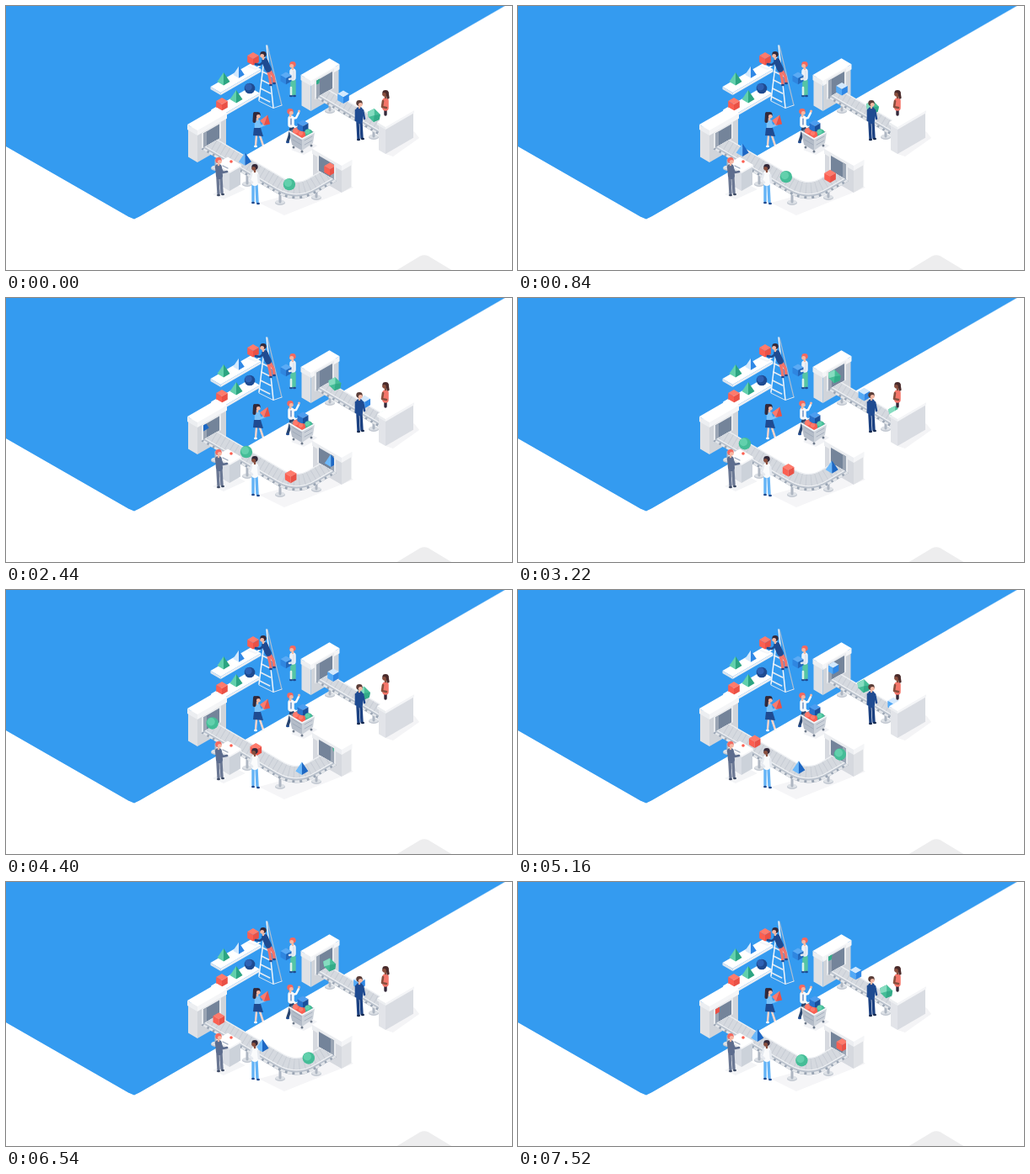
Animation, 600 px wide and 314 px high, one loop 7.54 s. Source, as an HTML page:

```html
<!DOCTYPE html>
<html lang="en">
<head>
<meta charset="utf-8">
<title>Sorting line</title>
<style>
html, body { margin: 0; height: 100%; overflow: hidden; background: #fff; }
svg { display: block; width: 100vw; height: 100vh; }
</style>
</head>
<body>
<svg id="stage" viewBox="0 0 600 314"></svg>
<script>
const LOOP = 7540;
const K = 0.58; // isometric slope
const RED = ['#ff7b6c', '#fb5f51', '#ea5146'];
const BLUE = ['#6cb9fb', '#389af0', '#1d68c4'];
const SKY = ['#d3e9fd', '#52a9f6', '#2f88e6'];
const GREEN = ['#62d0ac', '#45bd97', '#2ca582'];
const NAVY = '#1f4b91', DARK = '#33293a', SKIN = '#f6b9a4', BROWN = '#8a4f3e', GINGER = '#f4695f';
const SLAB = ['#fff', '#eceef1', '#f4f5f7'];

const poly = (points, fill) => `<polygon points="${points}" fill="${fill}"/>`;
const disc = (x, y, rx, fill, ry = rx) => `<ellipse cx="${x}" cy="${y}" rx="${rx}" ry="${ry}" fill="${fill}"/>`;
const line = (d, color, w) =>
  `<path d="${d}" fill="none" stroke="${color}" stroke-width="${w}" stroke-linecap="round" stroke-linejoin="round"/>`;
const at = (x, y, s, scale = 1) => `<g transform="translate(${x} ${y}) scale(${scale})">${s}</g>`;

// Block whose nearest top corner is (x, y): a to the left, b to the right, h down.
function box(x, y, a, b, h, [top, left, right]) {
  const l = [x - a, y - a * K], r = [x + b, y - b * K], back = [x + b - a, y - (a + b) * K];
  const down = ([px, py]) => [px, py + h];
  return poly([l, back, r, [x, y]], top) +
    poly([l, [x, y], [x, y + h], down(l)], left) +
    poly([r, [x, y], [x, y + h], down(r)], right);
}

const cube = (c, r = 6.8) => box(0, 0, r, r, r * 1.12, c);
const pyramid = c => poly('0,-8 -7.5,3 0,7.5', c[0]) + poly('0,-8 0,7.5 7.5,3', c[2]);
const ball = (c, r = 7.2) => disc(0, 0, r, c[1]) + disc(-1.5, -1.7, r * .65, c[0]);
const gem = poly('-7,-4 1,-8 8,-1 7,5 0,8 -6,2', '#45bd97') +
  poly('-7,-4 1,-8 1,0 -6,2', '#86dcc0') + poly('1,0 8,-1 7,5 0,8', '#33ab88');

function machine(x, y, a, b, h, left, right) {
  return box(x, y, a, b, h, ['#fff', left, right]) + box(x, y - 4, a + 1, b + 1, 6, SLAB);
}

// Opening in a face; dir is -1 when its upper edge rises to the right.
function opening(x, y, w, h, dir) {
  const p = (dx, dy) => [x + dx, y + dir * dx * K + dy];
  const quad = (l, r, t, b, c) => poly([p(l, t), p(r, t), p(r, b), p(l, b)], c);
  return quad(-2, w + 2, -2, h + 1, '#e9ebee') + quad(0, w, 0, h, '#74849a') +
    quad(dir < 0 ? 0 : w - 4, dir < 0 ? 4 : w, 0, h, '#9aa5b4');
}

function belt(d, w, clip) {
  const layer = (y, c, width, extra = '') =>
    `<path d="${d}" transform="translate(0 ${y})" fill="none" stroke="${c}" stroke-width="${width}" ${extra}/>`;
  return `<g clip-path="url(#${clip})">` + layer(5, '#9aa5b4', w) + layer(5, '#e3e6ea', w, 'stroke-dasharray="5 2.5"') +
    layer(2, '#b9c1cc', w) + layer(0, '#eef0f3', w) + layer(0, '#d5d9df', w - 2.5) +
    layer(0, '#c8cdd5', w - 2.5, 'stroke-dasharray="1 5"') + '</g>';
}

const foot = (x, y) => disc(x, y + 1, 6, '#c2c8d1', 3) + disc(x, y, 5.5, '#dde1e6', 2.6) +
  line(`M${x} ${y}v-9`, '#aeb6c2', 3);

// Figure placed by its head; face is -1 or 1 in profile and left out from behind.
function figure(x, y, o) {
  const skin = o.skin || SKIN;
  return at(x, y,
    line(o.legs, o.pants, o.legW || 3.4) + (o.shoes || []).map(([sx, sy]) => disc(sx, sy, 2, o.shoe || NAVY, 1.2)).join('') +
    line(o.torso || 'M0 8V16', o.top, o.width || 7.5) + line('M0 2V5', skin, 2.4) +
    disc(0, -.6, 3.7, o.hair, 3.4) + (o.face ? disc(o.face * 1.3, 1.3, 2.4, skin) : '') +
    line(o.arms, o.sleeve || o.top, 2.6));
}

const floor = poly('0,0 591,0 159,250 152,253.5 145,250.5 0,167', '#349bf0') +
  line('M593 -1L157 250.5Q152 253.5 147 250.5L-1 166', '#349bf0', .4) +
  '<path d="M462 315L491 297.5Q496 295 501 297.5L530 315z" fill="#ededee"/>' +
  poly('300,234 330,249 412,216 399,207', '#f5f5f7') +
  poly('245,224 258,230 284,218 270,211', '#f3f4f6') +
  poly('450,176 459,179 490,157 484,149', '#f4f4f6') +
  poly('338,171 353,177 371,167 357,160', '#f1f2f5');

const shelfTones = ['#fff', '#dbe4ee', '#eceff4'];
const shelves = box(254.5, 103, 12, 48, 3, shelfTones) + box(255, 130.5, 12, 46, 3, shelfTones) +
  at(258, 87, pyramid(GREEN)) + at(276, 79, pyramid(SKY), .9) +
  at(256, 117, cube(RED)) + at(273, 108, pyramid(GREEN)) +
  at(289, 98, ball(['#2f62b4', NAVY], 6.3));

const rungs = [78, 88, 98, 108].map(y => `M${304 - (y - 78) * .11} ${y}l12 6`).join('');
const ladder = line('M310 47L327 118', '#a9bdd3', 1.2) + line(rungs, '#e6ecf3', 1.5) +
  line('M307 56L300 112M309 47L317 121', '#f4f7fa', 1.5) + line('M300 113L317 121.500L327 118', '#dfe8f2', 1);

const upperPeople =
  at(293, 63, cube(RED)) + line('M288 72L296 75L301 71', '#f4f6f9', 2) +
  figure(305, 58, { hair: DARK, top: NAVY, pants: '#f47469', torso: 'M2 8L6 17', legs: 'M6 20L8 28L9 35M9 20L12 26L13 33',
    shoes: [[9, 36], [13, 34]], arms: 'M1 8L-4 12L-9 11', face: -1 }) +
  figure(340, 70, { hair: GINGER, top: '#eef2f7', pants: '#55c5a4', torso: 'M0 8V15', legs: 'M-1 19L-1 36M2 19L2 35',
    shoes: [[-2, 37], [2, 37]], arms: 'M1 8L1 14L-4 16', face: -1 }) +
  line('M338 97V105', '#d8f2ea', 2.6) +
  at(332, 86, cube(['#5cabf5', '#2f86e0', '#2368bb'], 6.5)) + line('M341 78L341 86L336 87', '#dfe6ef', 2.4) +
  figure(298, 130, { hair: DARK, top: '#7cc2f8', pants: '#fbd5ca', torso: 'M0 8V14', width: 6.5, face: 1,
    legs: 'M-1 24L-2 36M3 24L7 36', legW: 2.4, shoes: [[-2, 37], [8, 36]], shoe: '#fff', arms: 'M1 8L4 13L9 11' }) +
  line('M295 128L294.500 137', DARK, 4) + poly('294,145 302,145 305,155 293,154', NAVY) +
  at(308, 136, `<g transform="rotate(20)">${pyramid(RED)}</g>`, .85);

const cart = at(0, -1,
  figure(337, 127, { hair: GINGER, top: '#f7f8fa', pants: '#28446f', torso: 'M1 8L1 15', legs: 'M1 19L-1 29L-3 35M3 19L5 30',
    shoes: [[-3, 36]], arms: 'M2 8L7 7L10 1M0 9L2 15L6 18', face: 1 }) +
  disc(347.5, 126, 1.5, SKIN) + line('M338 135v7', '#4a78b8', 1.2) +
  poly('336,150 350,142 365,151 350,160', '#7c899d') +
  at(345, 151, ball(RED, 5)) + at(352, 144, cube(['#4c9df0', '#2872cc', '#1b509b'], 6.5)) +
  at(359, 152, ball(GREEN, 4.5)) + at(351, 154, ball(RED, 4)) +
  poly('336,150 351,159 351,173 339,166', '#b4bcc8') + poly('351,159 366,151 364,164 351,173', '#ccd2da') +
  line('M336 150L351 159L366 151', '#f4f6f8', 1.5) + line('M340 155L350 161M340 160L350 166M354 161L363 156M354 166L363 161', '#97a3b3', .7) +
  disc(341, 169, 1.5, '#6f7b8c') + disc(351, 174, 1.5, '#6f7b8c') + disc(362, 167, 1.5, '#6f7b8c'));

const lowerD = 'M231 156L325 211Q345 222.5 364 210.5L394 193';
const upperD = 'M366 96.5L452 147.5';
const lowerItems = [cube(RED), pyramid(BLUE), ball(GREEN)];
const upperItems = [cube(SKY), gem, cube(SKY), gem];
const movers = (id, items) => `<g id="${id}" clip-path="url(#${id}Clip)">${items.map(s => `<g>${s}</g>`).join('')}</g>`;

const upperLine = machine(361.5, 93, 11, 33, 32, '#dfe1e5', '#d0d4da') + opening(368, 89, 19, 20, -1) +
  foot(384, 124) + foot(436, 155) + belt(upperD, 12, 'upperBelt') + movers('upper', upperItems);

const desk =
  figure(450, 104, { hair: '#4a2b2b', skin: BROWN, top: '#f4766a', pants: DARK, torso: 'M0 9L0 17', legs: 'M0 18V25',
    arms: 'M-3 9L-4 16L1 17', sleeve: BROWN, face: -1 }) +
  line('M452 103L453 109', '#4a2b2b', 3.2) +
  box(450, 145, 8, 33, 31, ['#fff', '#e2e4e9', '#d9dce2']) + box(450, 144, 10, 34, 3, SLAB) +
  figure(419, 116, { hair: '#5a3d38', top: NAVY, pants: '#1b4182', torso: 'M0 8V20', width: 8,
    legs: 'M-2 23L-1 42M2 23L3 41', shoes: [[-1, 43], [4, 42]], shoe: '#15294f', arms: 'M-4 8L-4 20M4 8L6 18', face: 1 });

const lowerLine = machine(227, 152, 11, 34, 34, '#dfe1e5', '#d0d4da') + opening(234, 151.5, 19, 17, -1) +
  machine(398, 194, 34, 11.5, 28, '#d6d9df', '#e0e2e6') + opening(371, 178, 18, 18, 1) +
  [[249, 192], [286, 211], [325, 233], [368, 227]].map(p => foot(...p)).join('') +
  belt(lowerD, 15.5, 'lowerBelt') + movers('lower', [...lowerItems, ...lowerItems]);

const front = box(265, 198, 15, 13, 22, ['#fff', '#d9dde4', '#ccd2da']) + box(265, 197, 16, 14, 2, SLAB) +
  at(267, 185, disc(0, 0, 1.8, RED[1])) + line('M257 190l6 3', '#9ba8bb', 1.3) +
  figure(252, 184, { hair: GINGER, top: '#5d6d8e', pants: '#6b7894', torso: 'M0 8L1 18', width: 8, legs: 'M-1 21L0 39M3 21L4 38',
    shoes: [[0, 41], [5, 40]], shoe: '#3c4964', arms: 'M2 8L5 14L10 13', face: 1 }) +
  figure(295, 192, { hair: DARK, skin: BROWN, top: '#fafbfc', pants: '#63b3f6', torso: 'M0 8V18', width: 8,
    legs: 'M-2 21L-2 40M2 21L3 41', shoes: [[-2, 42], [4, 43]], arms: 'M-4 8L-6 15L-3 18M4 9L5 18', sleeve: '#e6eaf0', face: -1 });

const clip = (id, d) => `<clipPath id="${id}Clip"><path d="${d}z"/></clipPath>`;
document.getElementById('stage').innerHTML =
  clip('upper', 'M368 89L420 58H470V170H360V114L368 109') +
  clip('lower', 'M234 151.500L305 110H371V178L389 188.500V207L400 213V250H225V173L234 168.500') +
  clip('upperBelt', 'M360 113.600L400 90.400H470V170H360').replace('BeltClip', 'Belt') +
  clip('lowerBelt', 'M225 173.700L290 136H340L371 196L400 212.800V250H225').replace('BeltClip', 'Belt') +
  '<path id="track" d="M400 184.500L362 207.500Q345 219 325 207.500L222 144.600" fill="none"/>' +
  floor + shelves + ladder + upperPeople + upperLine + desk + cart + lowerLine + front;

const byId = id => document.getElementById(id);
const track = byId('track');
const lowerNodes = [...byId('lower').children], upperNodes = [...byId('upper').children];
const mod = (v, n) => (v % n + n) % n;
const move = (node, x, y) => node.setAttribute('transform', `translate(${x.toFixed(2)} ${y.toFixed(2)})`);

function draw(t) {
  lowerNodes.forEach((node, i) => {
    // The second copy of each piece is the one just about to enter.
    const u = mod(t - (i % 3) * LOOP / 3, LOOP) - (i < 3 ? 0 : LOOP);
    const s = Math.max(0, 18.6 + u * .0195, 11.2 + u * .0241);
    const p = track.getPointAtLength(s);
    move(node, p.x, p.y);
  });
  upperNodes.forEach((node, i) => {
    const u = mod(t - i * LOOP / 4 + 4000, LOOP) - 4000;
    const x = Math.min(452, 400 - u * .019);
    move(node, x, 108.5 + (x - 400) * .6);
  });
}

const start = performance.now();
(function tick() {
  draw((performance.now() - start) % LOOP);
  requestAnimationFrame(tick);
})();
</script>
</body>
</html>
```
